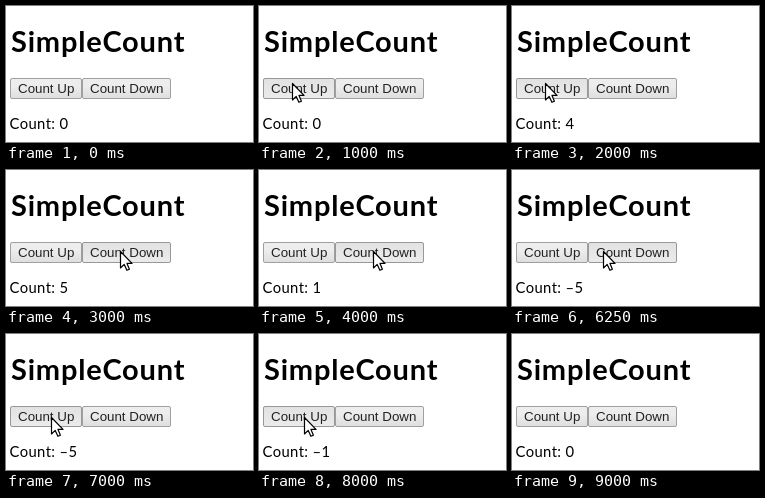
These frames come from a looping animation (247x136 px, 9.5 s). An HTML page:

```html
<!DOCTYPE html>
<html lang="en">
<head>
<meta charset="utf-8">
<title>SimpleCount</title>
<style>
html, body { margin: 0; width: 100%; height: 100%; overflow: hidden; background: #fff; }
svg { display: block; width: 247px; height: 136px; }
text { fill: #000; font-family: Lato, "Open Sans", sans-serif; }
.title { font-size: 29px; font-weight: 700; letter-spacing: .8px; }
.count { font-size: 14.8px; letter-spacing: .4px; }
.button rect { fill: url(#face); stroke: #a0a0a0; }
.button text { font: 13.33px "Liberation Sans", Arial, sans-serif; fill: #222; }
.button.hover rect { fill: url(#lit); stroke: #989898; }
</style>
</head>
<body>
<svg viewBox="0 0 247 136">
  <defs>
    <linearGradient id="face" x2="0" y2="1">
      <stop offset=".38" stop-color="#ededed"/><stop offset="1" stop-color="#dedede"/>
    </linearGradient>
    <linearGradient id="lit" x2="0" y2="1">
      <stop stop-color="#e2e2e2"/><stop offset="1" stop-color="#ebebeb"/>
    </linearGradient>
  </defs>
  <text class="title" x="5" y="46">SimpleCount</text>
  <g class="button" id="up">
    <rect x="4.5" y="72.5" width="71" height="20" rx="1.5"/>
    <text x="12" y="87">Count Up</text>
  </g>
  <g class="button" id="down">
    <rect x="76.5" y="72.5" width="88" height="20" rx="1.5"/>
    <text x="84" y="87">Count Down</text>
  </g>
  <text class="count" id="count" x="3.5" y="123">Count: 0</text>
  <path id="cursor" d="M.5 .5V17L4.2 13.4L6.9 19.3L9.4 18.2L7 12.4H12Z"
        fill="#fff" stroke="#000" stroke-width="1.2" stroke-linejoin="round"/>
</svg>
<script>
const LOOP = 9500, STEP = 250;
const $ = id => document.getElementById(id);
const clamp = k => Math.min(1, Math.max(0, k));
const easeOut = k => 1 - (1 - k) ** 2;

// where the cursor rests, from when until when, and what it adds to the count there
const stops = [
  { x: 2, y: 106, from: 250, to: 250, add: 0 },
  { x: 33, y: 77, from: 750, to: 2250, add: 5 },
  { x: 114, y: 81, from: 2750, to: 5750, add: -10 },
  { x: 91, y: 81, from: 6250, to: 6250, add: 0 },
  { x: 45, y: 83, from: 6750, to: 8250, add: 5 },
  { x: 79, y: 128, from: 8750, to: 8750, add: 0 }
];

function countAt(t) {
  return stops.reduce((sum, { from, to, add }) =>
    sum + (add && Math.trunc(add * clamp((t - from) / (to - from)))), 0);
}

function tipAt(t) {
  const i = stops.findIndex(s => t <= s.to);
  if (i < 0 || t < stops[0].from) return null;
  const b = stops[i], a = stops[i - 1] || b;
  const k = a === b ? 1 : easeOut(clamp((t - a.to) / (b.from - a.to)));
  return [Math.round(a.x + (b.x - a.x) * k), Math.round(a.y + (b.y - a.y) * k)];
}

function draw(now) {
  const t = Math.floor(now % LOOP / STEP) * STEP;
  $("count").textContent = "Count: " + String(countAt(t)).replace("-", "–");

  const tip = tipAt(t);
  const over = (left, right) => !!tip && tip[0] >= left && tip[0] < right && tip[1] >= 72 && tip[1] < 93;
  $("up").classList.toggle("hover", over(4, 76));
  $("down").classList.toggle("hover", over(76, 165));
  $("cursor").style.display = tip ? "" : "none";
  if (tip) $("cursor").setAttribute("transform", `translate(${tip})`);
}

const start = performance.now();
function tick() {
  draw(performance.now() - start);
  requestAnimationFrame(tick);
}
tick();
</script>
</body>
</html>
```
